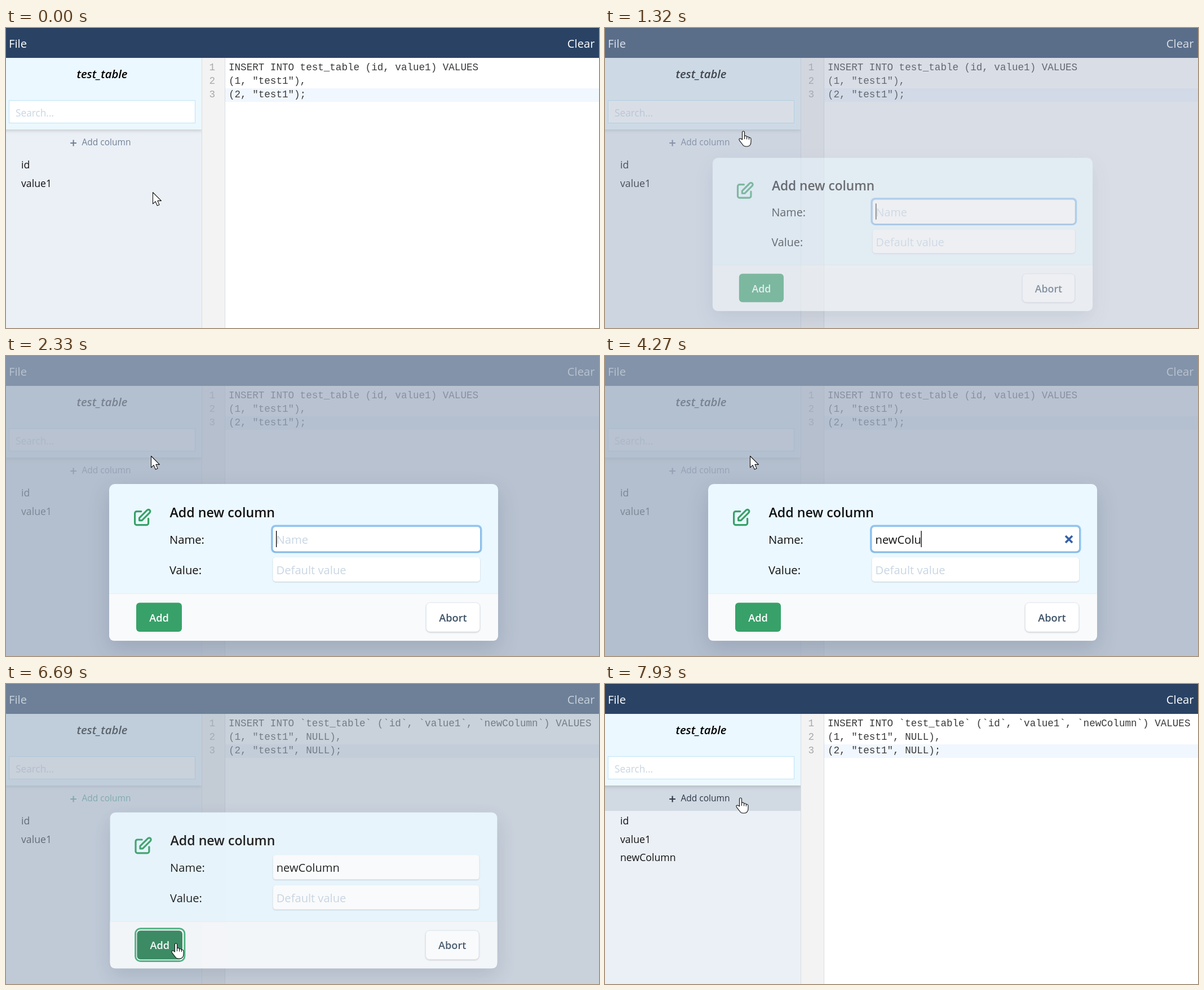
Write an HTML page that moves like this. It is 1052 px wide and 532 px high and loops after 8000 ms.

```html
<!DOCTYPE html>
<html lang="en">
<head>
<meta charset="utf-8">
<title>Add column</title>
<style>
html, body { margin: 0; width: 100%; height: 100%; overflow: hidden; background: #fff; }
svg { display: block; }
text { font-family: "Open Sans", "Noto Sans", sans-serif; white-space: pre; }
.bar { font-size: 20.2px; fill: #fff; }
.item { font-size: 17.7px; fill: #111; }
.code text { font: 17.58px "Liberation Mono", monospace; fill: #3a3a3a; }
.code .num { fill: #a8a8a8; }
.body { font-size: 20.2px; fill: #111; }
.hint { fill: #c8d6e3; }
.bold { font-weight: 600; }
.btn { font-size: 18.2px; font-weight: 600; text-anchor: middle; }
.head { filter: drop-shadow(0 2px 3px rgba(0, 0, 0, .16)); }
.card { filter: drop-shadow(0 14px 18px rgba(30, 50, 80, .16)); }
.field { fill: #fff; filter: drop-shadow(0 1px 1.2px rgba(0, 0, 0, .18)); }
.line { fill: none; stroke-linecap: round; stroke-linejoin: round; }
.ptr { fill: #fff; stroke: #111; stroke-width: 1.1; stroke-linejoin: round; }
</style>
</head>
<body>
<svg width="1052" height="532" viewBox="0 0 1052 532">
  <rect width="348" height="532" fill="#ebf0f6"/>
  <rect id="row" y="180" width="347" height="45" fill="#d1dae3"/>
  <rect class="head" x="-9" y="53" width="357" height="127" fill="#ebf8ff"/>
  <text class="bold" x="170.5" y="89" font-size="20.3" font-style="italic" text-anchor="middle">test_table</text>
  <rect x="5.5" y="128.5" width="330" height="40" fill="#fff" stroke="#bee3f8"/>
  <text class="hint" x="17" y="157" font-size="17.3">Search...</text>
  <g id="addCol">
    <path d="M114.2 204H125M119.6 198.6V209.4" stroke="currentColor" stroke-width="2.1"/>
    <text x="134.5" y="208" font-size="15.5" fill="currentColor">Add column</text>
  </g>
  <text class="item" x="27" y="249">id</text>
  <text class="item" x="27" y="282">value1</text>
  <text class="item" x="27" y="314" id="newItem">newColumn</text>

  <rect x="347" y="53" width="705" height="479" fill="#fff"/>
  <rect x="348" y="53" width="40" height="479" fill="#f3f3f3"/>
  <path d="M347.5 53V532M388.5 53V532" stroke="#dadde1"/>
  <rect x="389" y="107" width="663" height="24" fill="#f1f7fe"/>
  <g class="code">
    <text class="num" x="360.5" y="75">1</text>
    <text class="num" x="360.5" y="99">2</text>
    <text class="num" x="360.5" y="123">3</text>
    <text class="sql" x="395" y="75"></text>
    <text class="sql" x="395" y="99"></text>
    <text class="sql" x="395" y="123"></text>
  </g>
  <rect id="editCaret" x="530" y="109" width="1" height="20" fill="#000"/>

  <rect width="1052" height="53" fill="#2a4365"/>
  <path d="M0 .5H1052" stroke="#223858"/>
  <text class="bar" x="5" y="35">File</text>
  <text class="bar" x="1044.5" y="35" text-anchor="end">Clear</text>

  <rect id="shade" width="1052" height="532" fill="#a0aec0"/>

  <g id="modal">
    <rect class="card" x="183" y="227" width="690" height="278" rx="10" fill="#ebf8ff"/>
    <path d="M183 421H873V495Q873 505 863 505H193Q183 505 183 495Z" fill="#f8fafc"/>
    <path d="M183 421.5H873" stroke="#e6eef3"/>
    <path class="line" transform="translate(222.2 267.6) scale(1.6)" stroke="#38a169" stroke-width="2"
      d="M11 5H6a2 2 0 00-2 2v11a2 2 0 002 2h11a2 2 0 002-2v-5m-1.414-9.414a2 2 0 112.828 2.828L11.828 15H9v-2.828l8.586-8.586z"/>
    <text class="bold" x="290.5" y="286" font-size="23.2" fill="#111">Add new column</text>
    <text class="body" x="290" y="333">Name:</text>
    <text class="body" x="290" y="387">Value:</text>
    <rect id="focus" x="470" y="299.5" width="374.5" height="50" rx="8" fill="#90c5f2"/>
    <rect class="field" x="473.5" y="303" width="367.5" height="43.5" rx="5"/>
    <rect class="field" x="473.5" y="357" width="367.5" height="43" rx="5"/>
    <text class="body hint" x="479.5" y="333" id="nameHint">Name</text>
    <text class="body hint" x="479.5" y="387">Default value</text>
    <text class="body" x="479.5" y="333" id="name"></text>
    <rect id="caret" y="310" width="1.3" height="29" fill="#000"/>
    <path id="wipe" d="M817 319L829 331M829 319L817 331" stroke="#3560a8" stroke-width="3.6"/>
    <rect id="ring" x="228.2" y="434" width="87.6" height="58.2" rx="9" fill="#fff" stroke="#48b07c" stroke-width="3"/>
    <rect id="add" x="231" y="437.5" width="81" height="51.5" rx="6"/>
    <text class="btn" x="271.5" y="471" fill="#fff">Add</text>
    <rect class="field" x="745.5" y="437.5" width="95" height="51.5" rx="7" stroke="#e2e8f0"/>
    <text class="btn" x="793" y="471" fill="#3d5166">Abort</text>
  </g>

  <path id="arrow" class="ptr" d="M.5.5V20.8L5.1 16.6L8.3 24L12 22.4L8.9 15.4H15.4Z"/>
  <g id="hand" class="ptr">
    <path d="M-1.5 15V2Q-1.5 0 .5 0Q2.5 0 2.5 2V8.5Q6 7.4 6.6 10Q9.6 9 10.4 11.3Q14 11 14 14.5V18Q14 27 7 27H5Q1 27-1 23.5L-6.2 16.8Q-8 14.5-6.2 13.3Q-4 12.4-1.5 15Z"/>
    <path class="line" d="M2.5 8.5V13.5M6.6 10V14M10.4 11.3V14.5"/>
  </g>
</svg>
<script>
const $ = id => document.getElementById(id);
const show = (id, on) => $(id).setAttribute("visibility", on ? "visible" : "hidden");
const put = (el, s) => { if (el.textContent !== s) el.textContent = s; };
const within = (t, a, b) => t >= a && t < b;

const before = ["INSERT INTO test_table (id, value1) VALUES", '(1, "test1"),', '(2, "test1");'];
const after = ["INSERT INTO `test_table` (`id`, `value1`, `newColumn`) VALUES", '(1, "test1", NULL),', '(2, "test1", NULL);'];
const sql = document.querySelectorAll(".sql");
const keyTimes = [3040, 3110, 3260, 3490, 3660, 3890, 4270, 4500, 4750];

const stepAt = (t, a, b, n) => Math.max(-1, Math.min(n - 1, Math.floor((t - a) / (b - a) * (n - 1) + .15)));
const snap = (t, a, b, n) => a + stepAt(t, a, b, n) * (b - a) / (n - 1);

// Cubic Bezier easing, solved by bisection.
function ease(x, x1, y1, x2, y2) {
  if (x <= 0) return 0;
  if (x >= 1) return 1;
  const at = (u, a, b) => 3 * u * (1 - u) * ((1 - u) * a + u * b) + u ** 3;
  let lo = 0, hi = 1;
  for (let i = 0; i < 24; i++) {
    const mid = (lo + hi) / 2;
    if (at(mid, x1, x2) < x) lo = mid; else hi = mid;
  }
  return at(lo, y1, y2);
}

const home = [260, 291];
const moves = [
  { a: 770, b: 1080, n: 5, to: [245, 183] },
  { a: 1730, b: 1790, n: 2, to: [257, 177] },
  { a: 5740, b: 6380, n: 9, to: [301, 460], via: [150, 330] },
  { a: 7230, b: 7380, n: 3, to: [290, 418], late: true },
  { a: 7530, b: 7930, n: 6, to: [240, 202] }
];

function pointerAt(t) {
  let p = home;
  for (const { a, b, n, to, via, late } of moves) {
    if (t < a) break;
    const k = stepAt(t, a, b, n);
    const f = late ? k / (n - 1) : (k + 1) / n;
    const u = f * f * (3 - 2 * f);
    p = p.map((v, i) => {
      const mid = via ? via[i] : (v + to[i]) / 2;
      return v * (1 - u) ** 2 + 2 * u * (1 - u) * mid + to[i] * u * u;
    });
  }
  return p;
}

// Opacity of the dialog and of the shade behind it.
function fades(t) {
  if (t < 6530) {
    const p = ease((snap(t, 1250, 1560, 5) - 1260) / 300, 0, 0, .2, 1);
    return [p, p];
  }
  const x = (snap(t, 6530, 6840, 5) - 6635) / 205;
  return [1 - ease(x, .4, 0, 1, 1), 1 - Math.max(0, Math.min(1, x))];
}

function draw(t) {
  const [x, y] = pointerAt(t);
  const inRow = y >= 180 && y < 225 && !within(t, 1700, 7000);
  const onAdd = y >= 437 && t < 7300;
  const hand = inRow || onAdd;
  show("arrow", !hand);
  show("hand", hand);
  $(hand ? "hand" : "arrow").setAttribute("transform", `translate(${x} ${y})`);

  const hover = inRow && !within(t, 1310, 7000);
  show("row", hover);
  $("addCol").style.color = hover ? "#2d3748" : within(t, 6640, 6830) ? "#58a498" : "#718096";
  show("newItem", t >= 7230);
  show("editCaret", within(t, 230, 770));
  const lines = t >= 6600 ? after : before;
  sql.forEach((el, i) => put(el, lines[i]));

  const [p, q] = fades(t);
  $("shade").setAttribute("opacity", .75 * q);
  $("modal").setAttribute("opacity", p);
  $("modal").setAttribute("transform", `translate(528 366) scale(${.95 + .05 * p}) translate(-528 -366)`);
  $("modal").style.display = p > 0 ? "" : "none";

  const typed = "newColumn".slice(0, keyTimes.filter(k => t >= k).length);
  const pressed = t >= 6530;
  put($("name"), typed);
  show("nameHint", !typed);
  show("wipe", typed && !pressed);
  show("focus", !pressed);
  show("ring", pressed);
  $("add").setAttribute("fill", onAdd ? "#2f855a" : "#38a169");
  show("caret", within(t, 1250, 1790) || within(t, 2330, 2790) || within(t, 3040, 5280) || within(t, 5820, 6350));
  $("caret").setAttribute("x", 479 + (typed && p > 0 ? $("name").getComputedTextLength() : 0));
}

function tick() {
  draw(performance.now() % 8000);
  requestAnimationFrame(tick);
}
tick();
</script>
</body>
</html>
```
